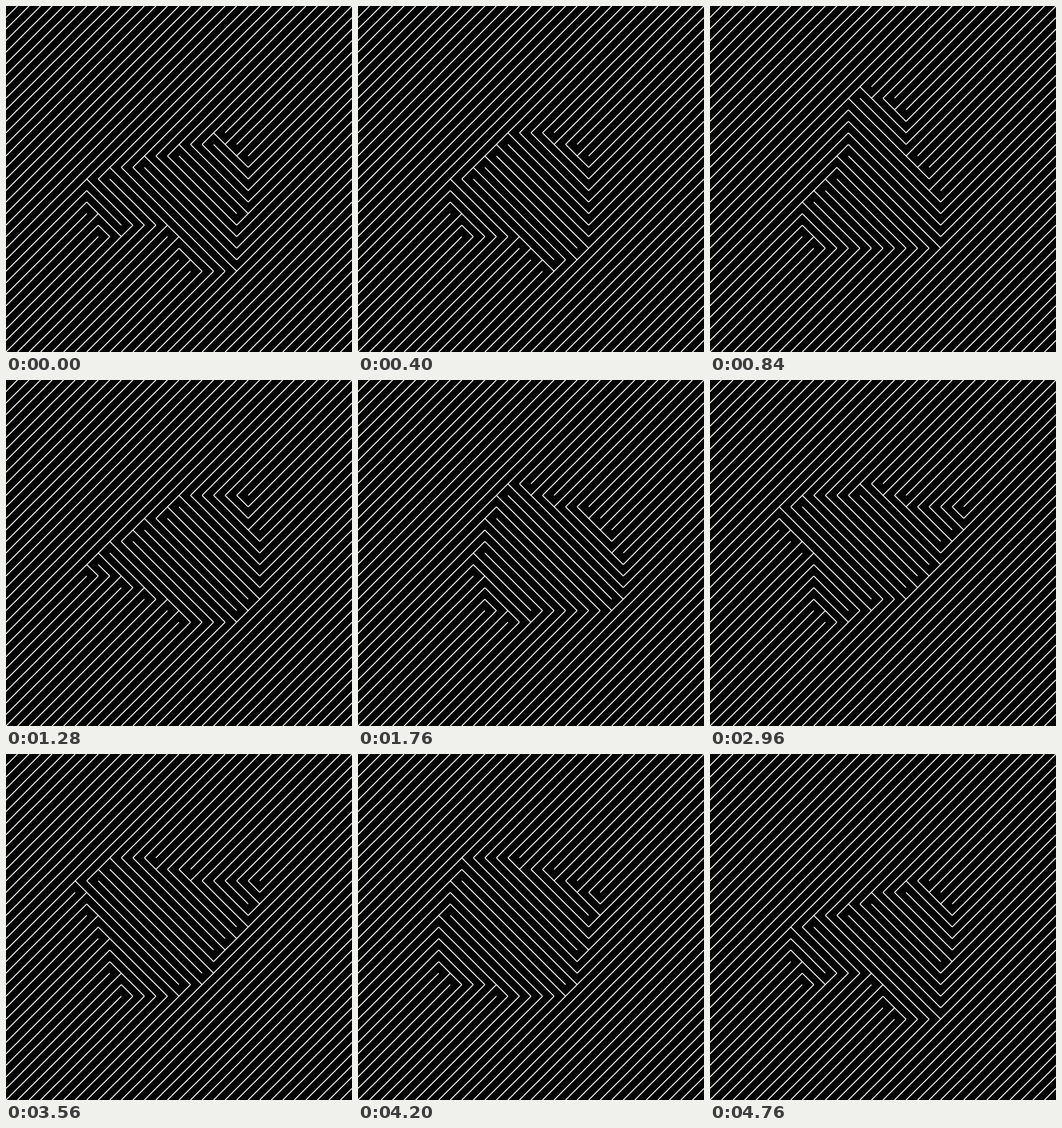
These frames come from a looping animation (500x500 px, 4800 ms). An HTML page with a canvas:

```html
<!DOCTYPE html>
<html lang="en">
<head>
<meta charset="utf-8">
<title>Diagonal lines</title>
<style>
  html, body { margin: 0; width: 100%; height: 100%; overflow: hidden; background: #000; }
  canvas { display: block; width: 500px; height: 500px; }
</style>
</head>
<body>
<canvas id="stage" width="500" height="500"></canvas>
<script>
const LOOP = 4800, STEP = 40, SIZE = 500, N = 30, CELL = SIZE / N, MID = N / 2;
const ctx = document.getElementById('stage').getContext('2d');

// The blob's corners in grid units at a few moments; it morphs in between.
const pose = (at, ...corners) => ({
  at, corners: corners.map(([x, y]) => ({ x: x - MID, y: y - MID }))
});
const poses = [
  pose(0, [19, 11], [21.3, 14], [19.5, 23], [16, 23], [13.5, 18.7], [8, 20], [7, 15.2]),
  pose(840, [20, 16.2], [20, 21], [8.8, 21], [8, 17.5], [12, 12.7], [12.6, 7], [17, 9], [17, 12.3]),
  pose(1280, [21.2, 10], [22.1, 19], [18.7, 21], [15, 21], [13, 18.8], [6.7, 16.4], [15.8, 10]),
  pose(2240, [13, 7.6], [20.6, 12.1], [23, 16.5], [22, 19.8], [11.4, 21.1], [11, 10.4]),
  pose(2960, [22.5, 11], [18, 18], [9.7, 21.3], [9, 16.2], [5.5, 11.2], [14.5, 9.1], [17, 10.5]),
  pose(4200, [13.4, 9.2], [21, 12.3], [18, 21], [13, 21], [7, 19], [7.4, 14], [9, 9])
];

// Distance from the middle to the outline in the direction (ux, uy).
function reach(corners, ux, uy) {
  let far = 0;
  corners.forEach((p, k) => {
    const q = corners[(k + 1) % corners.length];
    const a = ux * p.y - uy * p.x, b = ux * q.y - uy * q.x;
    if (a * b > 0 || a === b) return;
    const s = a / (a - b);
    far = Math.max(far, (p.x + s * (q.x - p.x)) * ux + (p.y + s * (q.y - p.y)) * uy);
  });
  return far;
}

const cells = Array.from({ length: N * N }, (_, k) => {
  const col = k % N, row = Math.floor(k / N);
  const dx = col + 0.5 - MID, dy = row + 0.5 - MID, dist = Math.hypot(dx, dy);
  return {
    x: col * CELL, y: row * CELL, dist, angle: Math.atan2(dy, dx),
    radii: poses.map(p => reach(p.corners, dx / dist, dy / dist))
  };
});

function draw(t) {
  const i = poses.findLastIndex(p => p.at <= t);
  const next = (i + 1) % poses.length;
  const u = (t - poses[i].at) / ((poses[next].at || LOOP) - poses[i].at);
  const swell = 0.6 * Math.sin(Math.PI * u), turn = 12 * Math.PI * t / LOOP;

  ctx.fillStyle = '#000';
  ctx.fillRect(0, 0, SIZE, SIZE);
  ctx.strokeStyle = '#fff';
  ctx.lineWidth = 1.4;
  ctx.beginPath();
  for (const c of cells) {
    const edge = c.radii[i] + (c.radii[next] - c.radii[i]) * u
      + swell * Math.sin(3 * c.angle + turn);
    const inside = c.dist < edge;
    ctx.moveTo(c.x, inside ? c.y : c.y + CELL);
    ctx.lineTo(c.x + CELL, inside ? c.y + CELL : c.y);
  }
  ctx.stroke();
}

const start = performance.now();
function tick() {
  const t = (performance.now() - start) % LOOP;
  draw(Math.floor(t / STEP) * STEP);
  requestAnimationFrame(tick);
}
tick();
</script>
</body>
</html>
```
